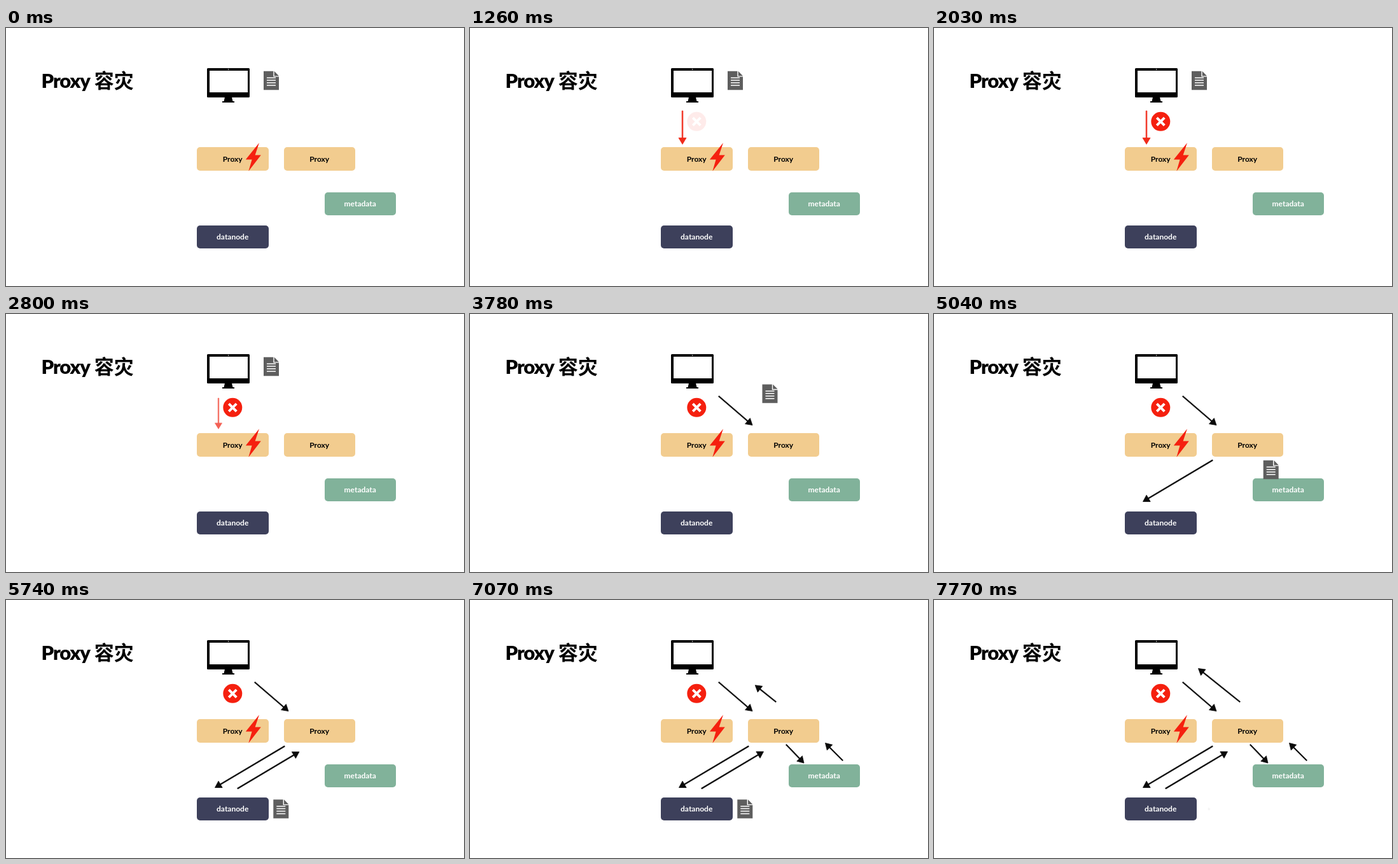
An HTML page for the animation above (8000 ms loop, 720 by 405 pixels).

```html
<!DOCTYPE html>
<html lang="zh">
<head>
<meta charset="utf-8">
<title>Proxy 容灾</title>
<style>
html, body { margin: 0; width: 100%; height: 100%; overflow: hidden; background: #fff; }
svg { display: block; width: 100vw; height: 100vh; }
.title { font: 900 31px Lato, "Noto Sans CJK SC", sans-serif; letter-spacing: -1.1px; }
.cjk { font: 700 31px "Noto Sans CJK SC", "Noto Sans CJK", sans-serif; }
.label { font: 700 12px Lato, sans-serif; text-anchor: middle; }
</style>
</head>
<body>
<svg viewBox="0 0 720 405">
  <rect width="720" height="405" fill="#fff"/>
  <text class="title" x="55.5" y="94">Proxy</text>
  <text class="cjk" x="138.8" y="94">容灾</text>

  <g id="monitor">
    <path fill-rule="evenodd" d="M317.5 63h64q1.500 0 1.500 1.500v43q0 1.500-1.500 1.500h-64q-1.500 0-1.500-1.500v-43q0-1.500 1.500-1.500zM320 67v34h60v-34z"/>
    <path d="M344 108.500h11l1.500 6.500h2.500v2h-19v-2h2.500z"/>
    <circle cx="349.500" cy="65" r=".8" fill="#fff"/>
  </g>

  <g id="nodes"></g>
  <path id="bolt" fill="#f5200f" d="M398 180.300L376.800 206.600H386.600L381.300 224.800L400.800 199.600H391.600z"/>

  <g id="cross">
    <circle cx="356.300" cy="146.800" r="15" fill="#f5200f"/>
    <path d="M350.300 140.800l12 12m0-12l-12 12" stroke="#fff" stroke-width="4"/>
  </g>

  <g id="arrows"></g>

  <g id="doc">
    <path fill="#5e5e5e" d="M-12-14.700H3.300V-6H12V14.700H-12z"/>
    <path fill="#5e5e5e" d="M4.700-14.700L12-7.300H4.700z"/>
    <path d="M-7-4.200H7M-7-.4H7M-7 3.500H7M-7 7.500H7" stroke="#fff" stroke-width="1.500"/>
  </g>
</svg>
<script>
const LOOP = 8000, STEP = 70, LAST = 7770;
const $ = id => document.getElementById(id);

function add(parent, tag, attrs, text) {
  const el = document.createElementNS("http://www.w3.org/2000/svg", tag);
  for (const k in attrs) el.setAttribute(k, attrs[k]);
  if (text) el.textContent = text;
  parent.appendChild(el);
  return el;
}

function node(x, y, w, h, fill, ink, label) {
  add($("nodes"), "rect", { x, y, width: w, height: h, rx: 5, fill });
  add($("nodes"), "text", { class: "label", x: x + w / 2 - .3, y: y + h / 2 + 4.2, fill: ink }, label);
}
node(300, 187, 113, 37, "#f2cc8f", "#000", "Proxy");
node(437, 187, 112, 37, "#f2cc8f", "#000", "Proxy");
node(501, 258, 112, 36, "#81b29a", "#fff", "metadata");
node(300, 310, 113, 36, "#3d405b", "#fff", "datanode");

function arrow(x1, y1, x2, y2, start, dur, color = "#0a0a0a") {
  const el = add($("arrows"), "path", {
    fill: color, stroke: color, "stroke-width": .8, "stroke-linejoin": "round"
  });
  return { el, x1, y1, x2, y2, start, dur };
}
const red = arrow(334, 130, 334, 182.5, 30, 570, "#f02a1a");
const arrows = [
  red,
  arrow(391, 129, 444, 174.5, 3170, 520),
  arrow(438, 229.5, 328.5, 294.5, 4194, 520),
  arrow(364, 296, 461.5, 238, 5245, 520),
  arrow(497, 227, 525, 256, 5770, 520),
  arrow(586, 252, 558.5, 224.5, 6290, 520),
  arrow(481, 160, 415.5, 107.5, 6810, 520)
];

const span = (t, start, dur) => Math.min(1, Math.max(0, (t - start) / dur));
const ease = u => (1 - Math.cos(Math.PI * u)) / 2;
const mix = (a, b, u) => a + (b - a) * u;

function drawArrow(a, t) {
  const u = span(t, a.start, a.dur);
  a.el.style.display = u > 0 ? "" : "none";
  const len = Math.hypot(a.x2 - a.x1, a.y2 - a.y1);
  const dx = (a.x2 - a.x1) / len, dy = (a.y2 - a.y1) / len;
  const tip = len * ease(u), neck = tip - 10;
  const at = (along, side) =>
    (a.x1 + dx * along - dy * side).toFixed(2) + " " + (a.y1 + dy * along + dx * side).toFixed(2);
  let d = `M${at(tip, 0)}L${at(neck, 6)}L${at(neck, -6)}z`;
  if (neck > 0) d += `M${at(0, .8)}L${at(neck, .8)}L${at(neck, -.8)}L${at(0, -.8)}z`;
  a.el.setAttribute("d", d);
}

// Swells a little, then shrinks and fades away.
function pop(u) {
  return { scale: Math.max(0, 1 - 2.2 * u ** 3 + 1.2 * u ** 2), alpha: 1 - u ** 3 };
}

function hop(t) {
  const u = span(t, 50, 1000) * 3, n = Math.floor(u), f = u - n;
  return n < 3 ? [34, 25, 17][n] * 4 * f * (1 - f) : 0;
}

function draw(t) {
  $("bolt").setAttribute("transform", `translate(0 ${-hop(t)})`);
  $("cross").setAttribute("opacity", span(t, 1203, 690));
  arrows.forEach(a => drawArrow(a, t));

  const r = pop(span(t, 2310, 770));
  red.el.setAttribute("transform", `translate(334 156) scale(${r.scale}) translate(-334 -156)`);
  red.el.setAttribute("opacity", r.alpha);

  const m1 = ease(span(t, 3380, 1000)), m2 = ease(span(t, 4660, 1000));
  const x = mix(mix(417, 574.7, m1), 432.3, m2);
  const y = mix(mix(82.5, 206, m1), 328, m2);
  const d = pop(span(t, 7365, 417));
  $("doc").setAttribute("transform", `translate(${x} ${y}) scale(${d.scale})`);
  $("doc").setAttribute("opacity", d.alpha);
}

const begin = performance.now();
function tick(now) {
  const t = Math.max(0, now - begin) % LOOP;
  draw(Math.min(LAST, Math.floor(t / STEP) * STEP));
  requestAnimationFrame(tick);
}
draw(0);
requestAnimationFrame(tick);
</script>
</body>
</html>
```
